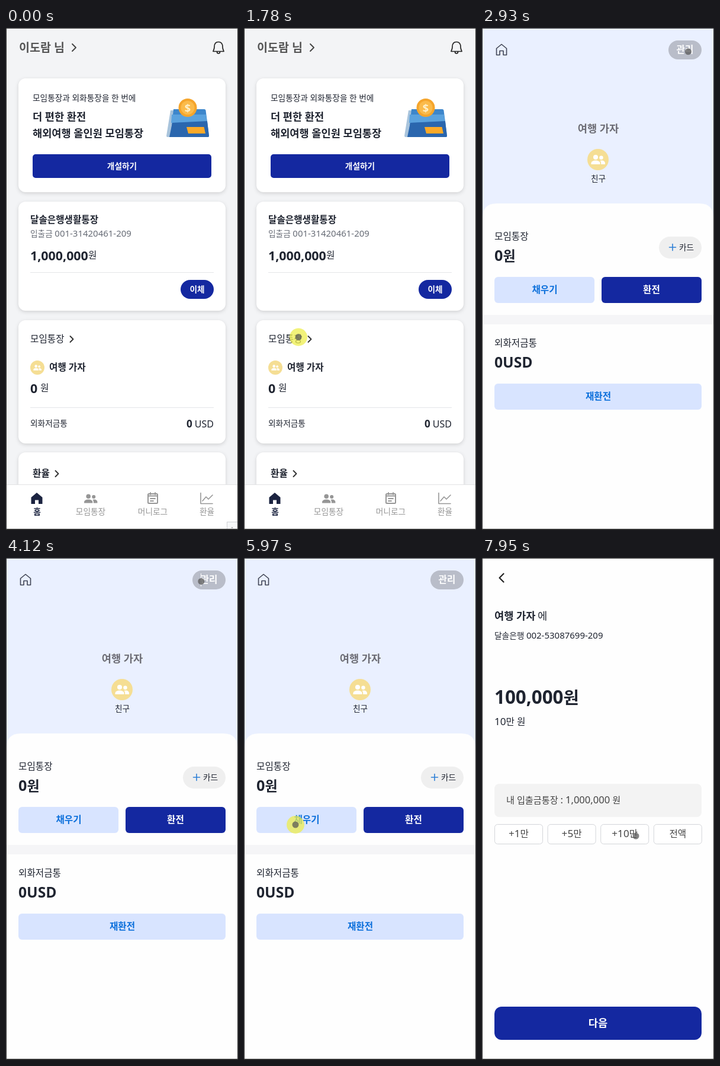
These frames come from a looping animation (392x847 px, 8000 ms). An HTML page:

```html
<!DOCTYPE html>
<html lang="ko">
<head>
<meta charset="utf-8">
<title>모임통장 채우기</title>
<style>
html, body { margin: 0; width: 100%; height: 100%; overflow: hidden; background: #fff; }
svg { display: block; width: 392px; height: 847px; }
text { font-family: 'Noto Sans', 'Noto Sans CJK KR', sans-serif; white-space: pre; }
.card { fill: #fff; filter: drop-shadow(0 2px 3px rgba(0, 0, 0, .14)); }
</style>
</head>
<body>
<svg id="stage" viewBox="0 0 392 847" xmlns="http://www.w3.org/2000/svg"></svg>
<script>
const NAVY = '#1428a0', INK = '#1f2430', SKY = '#d8e4ff', BLUE = '#0b6fdb', SAND = '#f5de94';
const LOOP = 8000, OPEN = 1978, FILL = 6238, AMOUNT = 7808, BLINK = 530;

const rect = (x, y, w, h, r, fill, more = '') =>
  `<rect x="${x}" y="${y}" width="${w}" height="${h}" rx="${r}" fill="${fill}" ${more}/>`;
const circle = (x, y, r, fill, more = '') => `<circle cx="${x}" cy="${y}" r="${r}" fill="${fill}" ${more}/>`;
const shape = (d, fill) => `<path d="${d}" fill="${fill}"/>`;
const line = (d, color, width = 2) =>
  `<path d="${d}" fill="none" stroke="${color}" stroke-width="${width}" stroke-linecap="round" stroke-linejoin="round"/>`;
const card = (y, h) => `<rect class="card" x="21" y="${y}" width="350" height="${h}" rx="12"/>`;
const chevron = (x, y, s, color = '#333') => line(`M${x - s / 2} ${y - s}l${s} ${s}l${-s} ${s}`, color, 1.9);

// Latin runs are set slightly larger than the Hangul around them.
function text(x, y, size, str, weight = 400, fill = INK, anchor = 'start') {
  const runs = str.replace(/[\w,.\-+:?]+/g, s => `<tspan font-size="${(size * 1.07).toFixed(2)}">${s}</tspan>`);
  return `<text x="${x}" y="${y}" font-size="${(size * .978).toFixed(2)}" font-weight="${weight}" ` +
    `fill="${fill}" text-anchor="${anchor}">${runs}</text>`;
}
const mid = (x, y, size, str, weight, fill) => text(x, y, size, str, weight, fill, 'middle');

const people = (x, y, s, color) => `<g transform="translate(${x} ${y}) scale(${s})">` +
  circle(-4, -4, 4, color) + circle(5.5, -3.2, 3.2, color) +
  shape('M-11.5 8V6C-11.5 0 3.5 0 3.5 6V8Z', color) +
  shape('M5.2 8V6Q5.2 3.4 3.6 2C8 .6 12 2.6 12 6V8Z', color) + '</g>';

function wallet() {
  return shape('M278 139L271 182Q271 184 273 184H290V139Z', '#a9c4dc') +
    shape('M283 137H335Q337 137 337.500 139L343 182Q343 184 341 184H278Z', '#3d86cb') +
    shape('M280 146H338L339.500 158L279 160Z', '#5aa2de') +
    shape('M281 160L340 157L343 182Q343 184 341 184H276Z', '#2a66ae') +
    shape('M305 167H334.500L337 178H308Z', '#fba928') +
    circle(307, 134.500, 15.500, '#f5a52c') + circle(307, 134.500, 11.500, '#fbbb4b') +
    mid(307, 141.500, 18.500, '$', 600, '#fff0c8');
}

function navBar() {
  const gray = '#969696';
  return rect(1, 770, 390, 76, 0, '#fff') + rect(1, 770, 390, 1, 0, '#e2e2e4') +
    shape('M52 784L61.500 792V803H55V796.500H49V803H42.500V792Z', '#1b2340') +
    people(143, 794, .95, gray) +
    `<rect x="240" y="786" width="16" height="16" rx="1.500" fill="none" stroke="${gray}" stroke-width="2"/>` +
    line('M240 789.500H256M244 784V787M252 784V787M244 794H252M244 798H249', gray, 1.8) +
    line('M329 784.500V802.500H349M332 798L338 791L342 795L349 788', gray, 1.6) +
    mid(52.500, 821, 14, '홈', 600, '#1b2340') + mid(143, 821, 14, '모임통장', 500, gray) +
    mid(248, 821, 14, '머니로그', 500, gray) + mid(339.500, 821, 14, '환율', 500, gray);
}

function homeScreen() {
  return rect(0, 0, 392, 847, 0, '#f3f4f6') +
    text(22, 40, 20, '이도람 님', 600, '#555') + chevron(115, 33, 6, '#444') +
    line('M359 23.500C353.500 23.500 352 28 352 32C352 36 350.500 37 350 39.500H368C367.500 37 366 36 366 32C366 28 364.500 23.500 359 23.500ZM356.500 40C356.500 44 361.500 44 361.500 40', '#222', 1.7) +
    card(85, 192) +
    text(45, 123, 14, '모임통장과 외화통장을 한 번에', 500) +
    text(45, 156, 18, '더 편한 환전', 600) + text(45, 184, 18, '해외여행 올인원 모임통장', 600) +
    wallet() + rect(45, 213, 302, 40, 5, NAVY) + mid(196, 238, 14, '개설하기', 700, '#fff') +
    card(293, 184) +
    text(41, 329, 16, '달솔은행생활통장', 600) +
    text(41, 352, 14, '입출금 001-31420461-209', 400, '#666b75') +
    text(41, 391.500, 20, '1,000,000', 700) + text(139, 389, 16, '원') +
    rect(41, 412, 310, 1, 0, '#e4e5e8') +
    rect(295, 425, 56, 32, 16, NAVY) + mid(323, 446, 14, '이체', 700, '#fff') +
    card(493, 208) +
    text(41, 529.500, 16, '모임통장', 500) + chevron(111, 525, 5) +
    circle(53, 573, 12, SAND) + people(53, 573, .58, '#fff') +
    text(73, 578, 16, '여행 가자', 600) +
    text(41, 615.500, 20, '0', 700) + text(58, 613, 16, '원') +
    rect(41, 640, 310, 1, 0, '#e4e5e8') +
    text(41, 672, 14, '외화저금통', 500) + text(305, 674, 16, '0', 700) + text(351, 674, 15, 'USD', 400, INK, 'end') +
    card(716, 150) + text(45, 757, 16, '환율', 600) + chevron(86, 752, 5) +
    navBar();
}

function groupScreen() {
  return rect(0, 0, 392, 847, 0, '#eaf0ff') +
    line('M24.500 34.500L33 27.500L41.500 34.500V45.500H36V38.500H30V45.500H24.500Z', '#3f4354', 1.6) +
    rect(315, 21, 56, 32, 16, '#b9bdc9') + mid(343, 42, 16, '관리', 700, '#fff') +
    mid(196.500, 175.500, 18, '여행 가자', 600, '#6c6c74') +
    circle(196, 222, 18, SAND) + people(196, 222, 1, '#fff') +
    mid(196.500, 259, 14, '친구', 500) +
    shape('M1 847V320Q1 296 25 296H367Q391 296 391 320V847Z', '#fefefe') +
    text(21, 356.500, 16, '모임통장') + text(21, 393, 23.500, '0원', 700) +
    rect(299, 352, 72, 37, 18.500, '#efefef') +
    line('M316.500 370H327.500M322 364.500V375.500', '#2d7fd6', 1.6) + text(333, 375, 14, '카드', 500) +
    rect(21, 420, 169, 44, 6, SKY) + mid(106, 447, 16, '채우기', 600, BLUE) +
    rect(202, 420, 169, 44, 6, NAVY) + mid(286.500, 447, 16, '환전', 700, '#fff') +
    rect(1, 484, 390, 16, 0, '#f5f5f7') +
    text(21, 536.500, 16, '외화저금통') + text(21, 573, 23, '0USD', 700) +
    rect(21, 600, 350, 44, 6, SKY) + mid(196.500, 627, 16, '재환전', 600, BLUE);
}

function fillScreen() {
  const chips = ['+1만', '+5만', '+10만', '전액'].map((s, i) => {
    const x = 21.5 + i * 89.6;
    return rect(x, 449.5, 81, 33, 5, '#fff', 'stroke="#d3d5d9"') + mid(x + 40.500, 471, 16, s, 400, '#444');
  }).join('');
  return rect(0, 0, 392, 847, 0, '#fefefe') +
    line('M36.500 26.500L29.500 33.500L36.500 40.500', '#222', 2.2) +
    text(21, 104, 18, '여행 가자', 600) + text(94, 104, 18, '에') +
    text(21, 136, 14, '달솔은행 002-53087699-209', 500) +
    rect(21, 381, 350, 56, 8, '#f3f3f3') + text(41, 414, 15.500, '내 입출금통장 : 1,000,000 원', 400, '#444') +
    chips +
    '<g id="empty">' + text(21, 246, 30, '얼마를 채울까요?', 700, '#9ca1b0') +
    rect(21, 757, 350, 56, 12, '#e2e4e3') + mid(196, 791, 18, '다음', 500, '#444') + '</g>' +
    '<g id="filled">' + text(21, 246, 29.300, '100,000원', 700) + text(21, 281.500, 16, '10만 원', 500) +
    rect(21, 757, 350, 56, 12, NAVY) + mid(196, 791, 18, '다음', 700, '#fff') + '</g>';
}

const group = (id, content) => `<g id="${id}">${content}</g>`;
document.getElementById('stage').innerHTML =
  group('home', homeScreen()) + group('account', groupScreen()) + group('fill', fillScreen()) +
  group('caretA', rect(329, 26, 1, 22, 0, '#fff')) + group('caretB', rect(21, 87, 1, 22, 0, '#222')) +
  group('status', rect(0, 824, 129, 22, 2, '#202124') + text(6, 839, 12.500, '연결 중...', 400, '#d5d7da')) +
  group('corner', rect(373.5, 833.5, 18, 13, 0, '#f7f8f9', 'stroke="#cfd2d5"') + rect(381, 842, 2, 2, 0, '#aaa')) +
  group('pointer', circle(0, 0, 15, '#eeee4e', 'id="ring"') + circle(0, 0, 5.500, '#555', 'opacity=".72"')) +
  shape('M0 0H392V847H0ZM1 1V845H391V1Z', '#333').replace('/>', ' fill-rule="evenodd"/>');

// Pointer path: time, x, y
const path = [
  [70, 386, 841], [400, 300, 700], [830, 197, 562], [900, 180, 546], [1030, 180, 546], [1170, 137, 524],
  [1300, 137, 524], [1370, 117, 521.5], [1500, 92, 521.5], [2130, 92, 521.5], [2500, 250, 260],
  [2750, 356, 80], [2930, 349, 40], [3080, 260, 8], [3300, 86, 130], [3500, 190, 223], [3780, 327, 46],
  [3850, 330, 38.5], [4120, 330, 38.5], [4620, 240, 498], [4880, 188, 450], [5700, 114, 450],
  [5770, 87, 450], [6400, 87, 450], [6780, 197, 390], [7060, 250, 450], [7190, 263, 469],
  [7290, 269, 473], [7400, 260, 469], [8000, 260, 469]
];
const clicks = [1705, 5965, 7665];
const el = id => document.getElementById(id);
const show = (id, on) => el(id).style.display = on ? '' : 'none';
const blinkOn = time => Math.floor(time / BLINK) % 2 === 0;

function pointerAt(t) {
  const i = Math.max(1, path.findIndex(p => p[0] > t));
  const [t0, x0, y0] = path[i - 1], [t1, x1, y1] = path[i];
  const k = Math.max(0, (t - t0) / (t1 - t0));
  return [x0 + (x1 - x0) * k, y0 + (y1 - y0) * k];
}

function draw(t) {
  const inAccount = t >= OPEN && t < FILL;
  show('home', t < OPEN);
  show('account', inAccount);
  show('fill', t >= FILL);
  show('empty', t < AMOUNT);
  show('filled', t >= AMOUNT);
  show('caretA', inAccount && blinkOn(t - OPEN));
  show('caretB', t >= FILL && blinkOn(t - FILL));
  show('status', t >= 1905 && t < 2390);
  show('corner', t < 70);
  show('pointer', t >= 70);
  el('pointer').setAttribute('transform', `translate(${pointerAt(t)})`);
  const age = Math.min(...clicks.map(c => t >= c ? t - c : Infinity));
  el('ring').setAttribute('opacity', Math.max(0, Math.min(.75, (200 - age) / 130)));
}

const start = performance.now();
function tick() {
  draw((performance.now() - start) % LOOP);
  requestAnimationFrame(tick);
}
tick();
</script>
</body>
</html>
```
